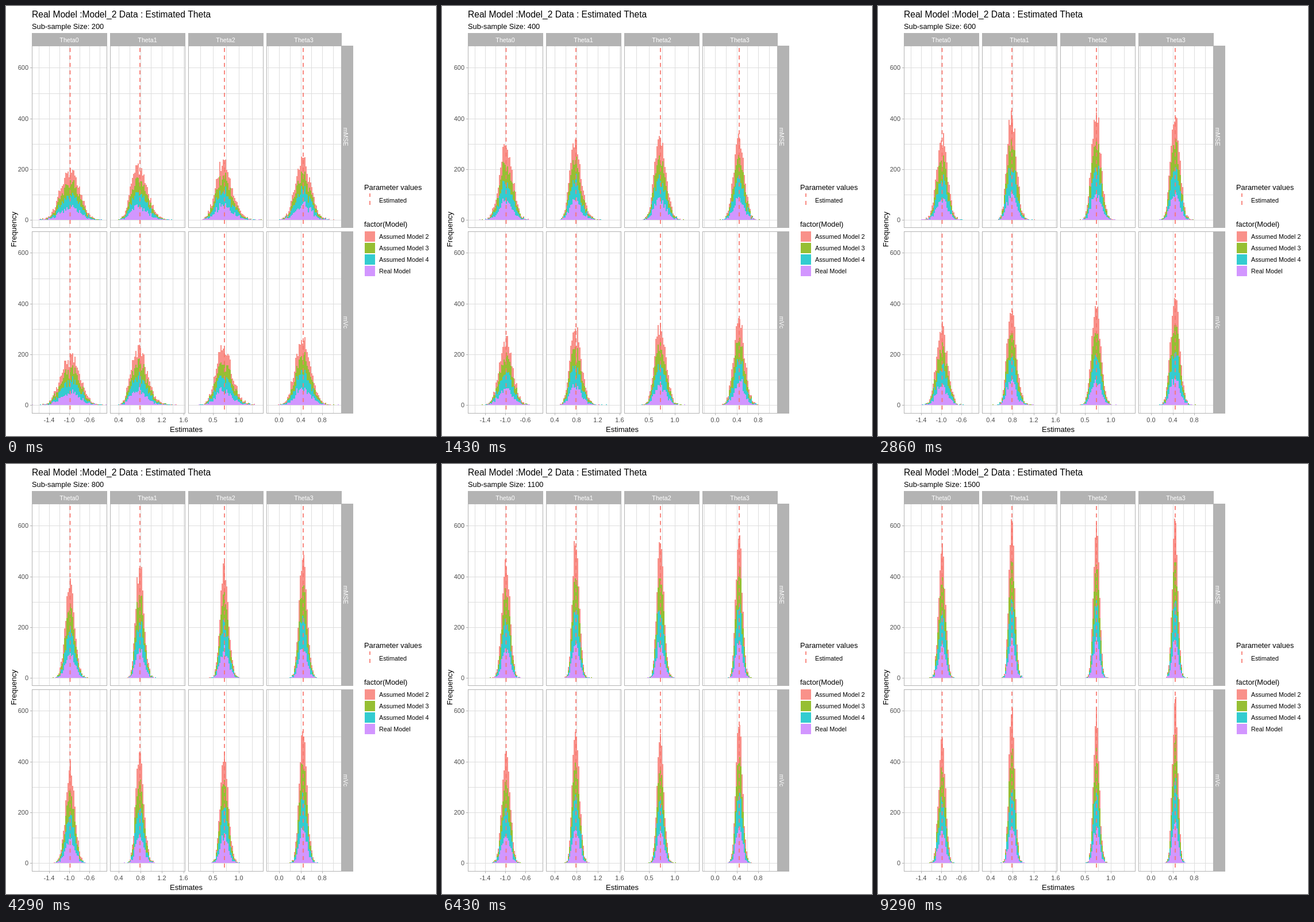
Animation, 748 px wide and 748 px high, one loop 10 s. Source, as an HTML page with a canvas:

```html
<!DOCTYPE html>
<html lang="en">
<head>
<meta charset="utf-8">
<title>Estimated Theta</title>
<style>
  html, body { margin: 0; width: 100%; height: 100%; overflow: hidden; background: #fff; }
  canvas { display: block; }
</style>
</head>
<body>
<canvas id="stage" width="748" height="748"></canvas>
<script>
const ctx = document.getElementById("stage").getContext("2d");
const LOOP = 10000, STEPS = 14, BIN = 2, BINS = 65;
const PANEL_W = 131, PANEL_H = 317, UNIT = 0.441;
const GREY = "#b3b3b3", GRID = "#dedede", DASH = "#f8766d";
// Stacked from the bottom up
const LAYERS = [
  ["Real Model", "#d296ff"],
  ["Assumed Model 4", "#33ccd0"],
  ["Assumed Model 3", "#96bf33"],
  ["Assumed Model 2", "#f9918a"]
];

const columns = [
  { left: 45, mean: 111.5, spread: 16.2, skew: 0, tick: 75, gap: 35.2, labels: ["-1.4", "-1.0", "-0.6"] },
  { left: 181, mean: 233, spread: 14, skew: 0.08, tick: 196, gap: 37.6, labels: ["0.4", "0.8", "1.2", "1.6"] },
  { left: 317, mean: 380, spread: 14, skew: 0.05, tick: 360, gap: 45, labels: ["0.5", "1.0"] },
  { left: 453, mean: 517, spread: 13.4, skew: 0.03, tick: 475, gap: 37.5, labels: ["0.0", "0.4", "0.8"] }
];
const PEAK_SIZES = [200, 400, 600, 800, 1000, 1300, 1500];
const rows = [
  { top: 69, zero: 372, name: "mMSE", peaks: [
    [205, 300, 342, 393, 440, 520, 530],
    [222, 318, 430, 438, 528, 565, 625],
    [237, 330, 425, 455, 518, 570, 612],
    [250, 340, 405, 485, 532, 625, 628]] },
  { top: 392, zero: 694, name: "mVc", peaks: [
    [203, 272, 328, 403, 425, 475, 492],
    [237, 305, 372, 435, 487, 580, 612],
    [235, 325, 390, 440, 488, 555, 612],
    [268, 342, 422, 520, 518, 600, 655]] }
];

function seededRandom(seed) {
  return () => {
    seed = (seed + 0x6d2b79f5) | 0;
    let t = Math.imul(seed ^ (seed >>> 15), 1 | seed);
    t = (t + Math.imul(t ^ (t >>> 7), 61 | t)) ^ t;
    return ((t ^ (t >>> 14)) >>> 0) / 4294967296;
  };
}

function peakAt(peaks, size) {
  const i = Math.max(1, PEAK_SIZES.findIndex(s => s >= size));
  const a = PEAK_SIZES[i - 1], b = PEAK_SIZES[i];
  return peaks[i - 1] + (peaks[i] - peaks[i - 1]) * (size - a) / (b - a);
}

// The spread of the estimates shrinks with the root of the sub-sample size.
function histogram(column, peak, size, seed) {
  const random = seededRandom(seed), narrow = Math.sqrt(200 / size);
  const bins = Array.from({ length: BINS }, () => [0, 0, 0, 0]);
  for (let i = 0; i < 4000; i++) {
    const z = Math.sqrt(-2 * Math.log(1 - random())) * Math.cos(2 * Math.PI * random());
    const x = column.mean + column.spread * narrow * (z + column.skew * narrow * (z * z - 1));
    const bin = bins[Math.floor((x - column.left) / BIN)];
    if (bin) bin[i % 4]++;
  }
  const scale = peak / Math.max(...bins.map(b => b[0] + b[1] + b[2] + b[3]));
  return bins.map(b => b.map(count => count * scale));
}

const frames = Array.from({ length: STEPS }, (_, step) => {
  const size = 200 + 100 * step;
  return rows.map((row, r) => columns.map((column, c) =>
    histogram(column, peakAt(row.peaks[c], size), size, 1 + step * 101 + r * 37 + c * 7)));
});

function box(x, y, w, h, color) {
  ctx.fillStyle = color;
  ctx.fillRect(x, y, w, h);
}

// y is the middle of the capitals
function text(label, x, y, size, color = "#000", align = "left", turn = 0) {
  ctx.save();
  ctx.translate(x, y);
  ctx.rotate(turn);
  ctx.font = `${size}px "Liberation Sans", Arial, sans-serif`;
  ctx.textAlign = align;
  ctx.fillStyle = color;
  ctx.fillText(label, 0, size * 0.36);
  ctx.restore();
}

function dashedLine(x, from, to) {
  ctx.save();
  ctx.strokeStyle = DASH;
  ctx.lineWidth = 1.7;
  ctx.setLineDash([7, 6]);
  ctx.beginPath();
  ctx.moveTo(x, from);
  ctx.lineTo(x, to);
  ctx.stroke();
  ctx.restore();
}

function drawBars(bins, left, zero) {
  bins.forEach((counts, i) => {
    let total = 0, base = 0;
    counts.forEach((count, layer) => {
      if (!count) return;
      total += count;
      const top = Math.max(1, Math.round(total * UNIT));
      box(left + i * BIN, zero - top, BIN, top - base, LAYERS[layer][1]);
      base = top;
    });
  });
}

function drawPanel(column, row, bins) {
  const { left, mean, tick, gap } = column, { top, zero } = row;
  for (let value = 0; value <= 600; value += 100)
    box(left, Math.round(zero - value * UNIT), PANEL_W, 1, GRID);
  for (let i = -1; i < 8; i++) {
    const x = Math.round(tick + i * gap / 2);
    if (x > left && x < left + PANEL_W) box(x, top, 1, PANEL_H, GRID);
  }
  drawBars(bins, left, zero);
  dashedLine(mean, top + 4, top + PANEL_H);
  ctx.strokeStyle = GREY;
  ctx.lineWidth = 1;
  ctx.strokeRect(left + 0.5, top + 0.5, PANEL_W - 1, PANEL_H - 1);
}

function drawAxes() {
  columns.forEach((column, c) => {
    box(column.left, 47, PANEL_W, 22, GREY);
    text("Theta" + c, column.left + PANEL_W / 2 - 0.5, 59, 10.7, "#fff", "center");
    column.labels.forEach((label, i) => {
      const x = Math.round(column.tick + i * column.gap);
      box(x, 709, 1, 3, GREY);
      text(label, x, 720.5, 11, "#4d4d4d", "center");
    });
  });
  rows.forEach(row => {
    box(583, row.top, 21, PANEL_H, GREY);
    text(row.name, 591, row.top + PANEL_H / 2, 10.7, "#fff", "center", Math.PI / 2);
    for (let value = 0; value <= 600; value += 200) {
      const y = Math.round(row.zero - value * UNIT);
      box(42, y, 3, 1, GREY);
      text(value, 39, y + 0.5, 11, "#4d4d4d", "right");
    }
  });
  text("Estimates", 313.5, 736, 13, "#000", "center");
  text("Frequency", 13, 388.5, 13, "#000", "center", -Math.PI / 2);
}

function drawLegend() {
  text("Parameter values", 623, 315, 12.8);
  dashedLine(633, 326, 332);
  dashedLine(633, 339, 346);
  text("Estimated", 649, 338, 10.8);
  text("factor(Model)", 623, 379, 12.8);
  LAYERS.forEach(([name, color], i) => {
    const y = 392 + 20 * (3 - i);
    box(624, y, 18, 18, color);
    text(name, 649, y + 9.5, 10.8);
  });
}

function draw(step) {
  box(0, 0, 748, 748, "#fff");
  text("Real Model :Model_2 Data : Estimated Theta", 45, 14, 15.6);
  text("Sub-sample Size: " + (200 + 100 * step), 45, 35, 12.8);
  rows.forEach((row, r) => columns.forEach((column, c) =>
    drawPanel(column, row, frames[step][r][c])));
  drawAxes();
  drawLegend();
}

let shown = -1;
function tick() {
  const time = performance.now() % LOOP;
  const step = Math.min(STEPS - 1, Math.floor((time + 3) * STEPS / LOOP));
  if (step !== shown) draw(shown = step);
  requestAnimationFrame(tick);
}
tick();
</script>
</body>
</html>
```
